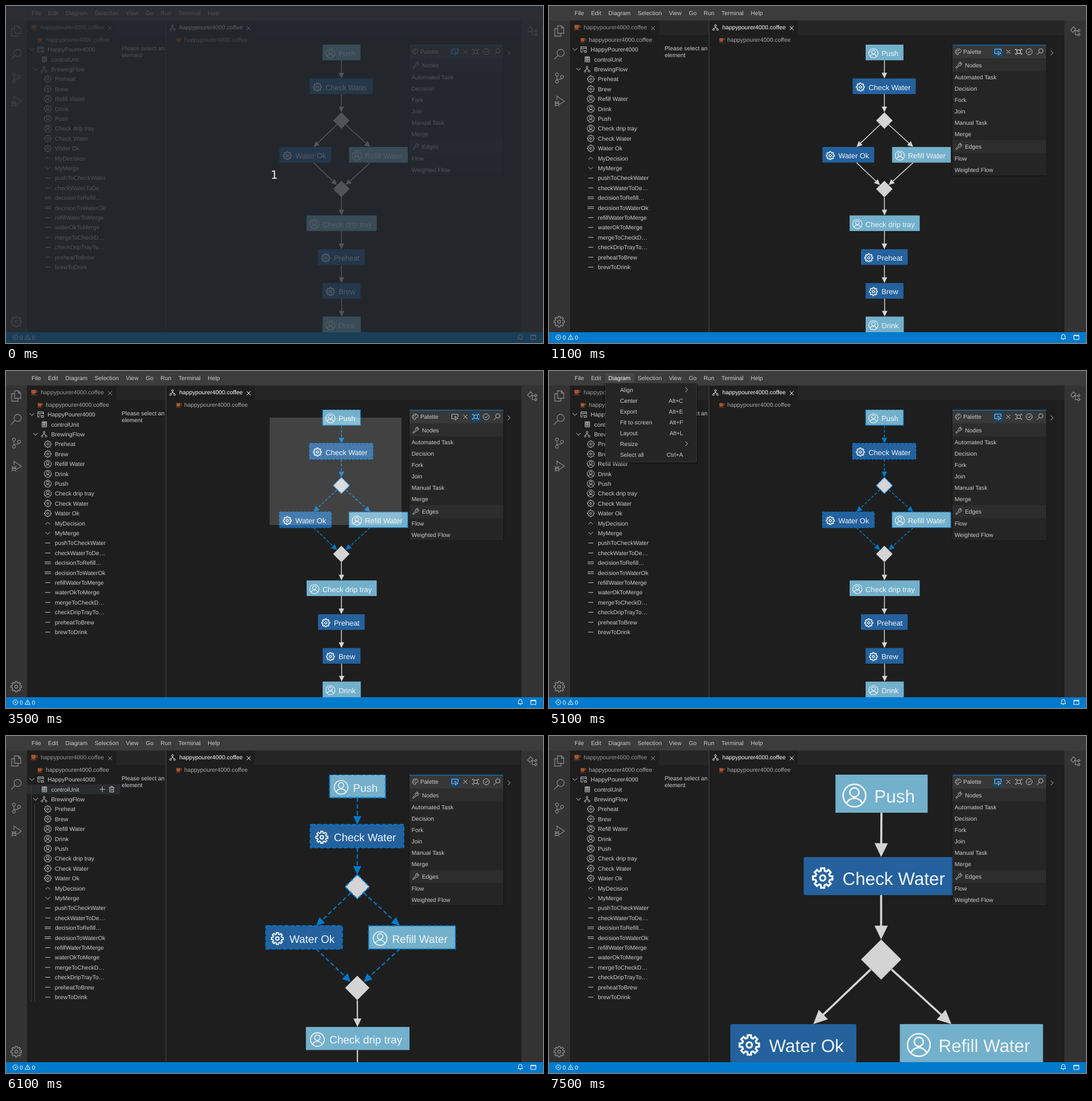
These frames come from a looping animation (945x593 px, 8000 ms). An HTML page:

```html
<!DOCTYPE html>
<html lang="en">
<head>
<meta charset="utf-8">
<title>Workflow editor</title>
<style>
html, body { margin: 0; width: 100%; height: 100%; overflow: hidden; background: #1e1e1e; }
svg { display: block; width: 945px; height: 593px; }
text { font: 10.3px "Liberation Sans", Arial, sans-serif; fill: #ccc; text-rendering: geometricPrecision; }
.node text { font-size: 12.9px; fill: #f1f6fa; }
.edge { stroke: #d4d4d4; fill: #d4d4d4; }
.edge path { stroke: none; }
.edge line { stroke-width: 1.5; }
.edge.on { stroke: #007acc; fill: #007acc; }
.edge.on line { stroke-dasharray: 5 3; }
.node.on .shape { stroke: #007acc; stroke-width: 1.4; stroke-dasharray: 5 2; }
.hot text, text.hot { fill: #fff; }
.hot path { stroke: #fff; }
.end { text-anchor: end; }
</style>
</head>
<body>
<svg id="stage" viewBox="0 0 945 593"></svg>
<script>
const LOOP = 8000, GREY = '#858585', LIGHT = '#c5c5c5', FILE = 'happypourer4000.coffee';

const rect = (x, y, w, h, fill, extra = '') =>
  `<rect x="${x}" y="${y}" width="${w}" height="${h}" fill="${fill}" ${extra}/>`;
const text = (x, y, s, extra = '') => `<text x="${x}" y="${y}" ${extra}>${s}</text>`;
const icon = (d, x, y, color = LIGHT, width = 1, scale = 1) =>
  `<path d="${d}" fill="none" stroke="${color}" stroke-width="${width / scale}" transform="translate(${x} ${y}) scale(${scale})"/>`;
const group = (id, body, extra = '') => `<g id="${id}" ${extra}>${body}</g>`;
const ring = (x, y, r) => `M${x - r},${y}a${r},${r} 0 1 0 ${2 * r},0a${r},${r} 0 1 0 ${-2 * r},0`;

function gearPath() {
  const points = [];
  for (let i = 0; i < 8; i++) {
    for (const [offset, r] of [[-.26, .7], [-.17, .94], [.17, .94], [.26, .7]]) {
      const a = i * Math.PI / 4 + offset;
      points.push((r * Math.cos(a)).toFixed(3) + ',' + (r * Math.sin(a)).toFixed(3));
    }
  }
  return 'M' + points.join('L') + 'Z' + ring(0, 0, .26);
}

const D = {
  gear: gearPath(),
  person: ring(0, 0, .95) + ring(0, -.27, .38) + 'M-.66,.68A.68,.6 0 0 1 .66,.68',
  up: 'M-4,2L0,-2L4,2',
  down: 'M-4,-2L0,2L4,-2',
  right: 'M-2,-4L2,0L-2,4',
  dash: 'M-4.5,0H4.5',
  equal: 'M-5.5,-1.5H5.5M-5.5,1.5H5.5',
  close: 'M-3.5,-3.5L3.5,3.5M3.5,-3.5L-3.5,3.5',
  flow: ring(0, -3.5, 1.6) + ring(-3.5, 3.5, 1.5) + ring(3.5, 3.5, 1.5) + 'M0,-2V0M-3.5,2L0,-.3L3.5,2',
  root: 'M-5,-4.5H5V0M-5,-4.5V4.5H-1M-5,-2H5M1,2H5V5H1ZM-3,1H0',
  unit: 'M-4,-4.5H4V-2H-4ZM-4,-2V1H4V-2M-4,1V4.5H4V1M-2,-3.2H2M-2,-.5H2M-2,2.7H2',
  search: ring(1.5, -1.5, 3.8) + 'M-1.2,1.2L-5.5,5.5',
  wrench: 'M-5,4L0,-1C-1,-4 2,-6 4,-5L2,-3L3,-1.5L5,-3.5C6,-1 4,2 1,1L-3.5,5.5Q-5,6 -5,4Z',
  palette: 'M-.5,5C-7,4 -6,-5 .5,-5C5,-5 6,-1 4.5,1C3,2.5 1,0 .5,2Q1.5,5 -.5,5' + ring(-2, -1.5, .6) + ring(1, -2.6, .6) + ring(-2.4, 1.5, .5),
  select: 'M-1,3.5H-5.5V-4.5H5.5V0M0,-1L5.5,3L2.5,3.5L1,6Z',
  marquee: 'M-3,-3H3V3H-3ZM-5.5,-2.5V-4.5H-3.5M3.5,-4.5H5.5V-2.5M5.5,2.5V4.5H3.5M-3.5,4.5H-5.5V2.5',
  check: ring(0, 0, 5.3) + 'M-2.5,0L-.6,2L2.7,-2',
  error: ring(0, 0, 4.3) + 'M-1.7,-1.7L1.7,1.7M1.7,-1.7L-1.7,1.7',
  warn: 'M0,-4.2L4.6,4H-4.6ZM0,-1.5V1.5M0,2.3V3.2',
  bell: 'M-4,3H4L3,1V-1.5A3,3 0 0 0 -3,-1.5V1ZM-1,4.5H1',
  window: 'M-4.5,-3.8H4.5V3.8H-4.5ZM-4.5,-2.5H4.5',
  files: 'M-3,-9H4L8,-5V4H-3ZM4,-9V-5H8M-3,-4H-8V9H3V4',
  branch: ring(-4, -6, 2.6) + ring(-4, 6.5, 2.6) + ring(5, -2, 2.6) + 'M-4,-3.4V4M5,.6C5,4 -4,1 -4,4',
  debug: 'M-4,-2V-9L9,0L0,6M-8,4H0M-8,0L-6,2M0,0L-2,2M-8,9L-6,7M0,9L-2,7' + ring(-4, 4.5, 3.2),
  classes: 'M-8,-2L-3,-8L1,-4L-4,2ZM-2,-1H4M0,-1V6H4M4,-1L6.5,-3.5L8.5,-1.5L6,1ZM4,6L6.5,3.5L8.5,5.5L6,8Z',
  plus: 'M-5,0H5M0,-5V5',
  trash: 'M-4.5,-3.5H4.5M-1.5,-3.5V-5H1.5V-3.5M-3.5,-3.5V4.8H3.5V-3.5M-1.2,-1.5V3M1.2,-1.5V3'
};

const cup = (x, y, s = 1) => `<g transform="translate(${x} ${y}) scale(${s})">`
  + `<path d="M-5,-4H3V0Q3,3 0,3H-2Q-5,3 -5,0ZM-6,4H4V5H-6Z" fill="#a9532e"/>`
  + `<path d="M3,-3H5.5V0H3" fill="none" stroke="#a9532e"/></g>`;

// Workflow diagram
const NODES = [
  ['person', 'Push', 557.2, 68, 66.6], ['gear', 'Check Water', 534.3, 127.5, 111.2],
  ['diamond', '', 575.7, 187, 29], ['gear', 'Water Ok', 481.3, 248.1, 91],
  ['person', 'Refill Water', 603.7, 248.1, 103.4], ['diamond', '', 575.7, 307.5, 29],
  ['person', 'Check drip tray', 529, 368.5, 123.4], ['gear', 'Preheat', 549, 428, 82.2],
  ['gear', 'Brew', 557.2, 487.4, 66.6], ['person', 'Drink', 557.2, 546.5, 67.2]
].map(([kind, label, x, y, w]) => ({ kind, label, x, y, w, h: kind === 'diamond' ? 29 : 27.5 }));

const EDGES = [
  [590.4, 95.5, 590.2, 127.5], [590.2, 155, 590.2, 187], [582.6, 208.7, 541.2, 248.1],
  [597.8, 208.7, 640.9, 248.1], [541.2, 275.6, 582.6, 315], [640.9, 275.6, 597.8, 315],
  [590.2, 336.5, 590.4, 368.5], [590.4, 396, 590.2, 428], [590.2, 455.5, 590.4, 487.4],
  [590.6, 515, 590.8, 546.5]
];

function nodeSvg({ kind, label, x, y, w, h }) {
  if (kind === 'diamond') {
    const r = w / 2;
    return `<g class="node"><path class="shape" fill="#d4d4d4" d="M${x + r},${y}l${r},${r}l${-r},${r}l${-r},${-r}Z"/></g>`;
  }
  const gear = kind === 'gear';
  return '<g class="node">' + rect(x, y, w, h, gear ? '#24619d' : '#73b0cb', `class="shape" rx="${gear ? 1 : 0}"`)
    + icon(D[kind], x + 13.7, y + 15.1, '#f1f6fa', gear ? 1.4 : 1.1, gear ? 7.6 : 8.6)
    + text(x + 28, y + 20, label) + '</g>';
}

function edgeSvg([x1, y1, x2, y2]) {
  const length = Math.hypot(x2 - x1, y2 - y1), k = 1 - 8 / length;
  const angle = Math.atan2(y2 - y1, x2 - x1) * 180 / Math.PI;
  return `<g class="edge"><line x1="${x1}" y1="${y1}" x2="${x1 + (x2 - x1) * k}" y2="${y1 + (y2 - y1) * k}"/>`
    + `<path d="M0,0L-10,-4.8V4.8Z" transform="translate(${x2} ${y2}) rotate(${angle})"/></g>`;
}

// Model tree
const ROW = 17.41;
const TREE = [
  ['gear', 'Preheat,Brew'], ['person', 'Refill Water,Drink,Push,Check drip tray'],
  ['gear', 'Check Water,Water Ok'], ['up', 'MyDecision'], ['down', 'MyMerge'],
  ['dash', 'pushToCheckWater,checkWaterToDe…'], ['equal', 'decisionToRefill…,decisionToWaterOk'],
  ['dash', 'refillWaterToMerge,waterOkToMerge,mergeToCheckD…,checkDripTrayTo…,preheatToBrew,brewToDrink']
].flatMap(([kind, labels]) => labels.split(',').map(label => [kind, label]));

function treeSvg() {
  const y = i => 76.4 + ROW * i;
  let out = group('treeHover', rect(37, 0, 164, ROW, '#2a2d2e') + icon(D.plus, 169.5, 8.7) + icon(D.trash, 186, 8.7))
    + group('guides', icon('M44.5,85V467M50.5,120V467', 0, 0, '#3d3d3d'));
  out += icon(D.down, 45.5, y(0)) + icon(D.root, 61, y(0)) + text(73.3, y(0) + 3.7, 'HappyPourer4000')
    + icon(D.unit, 67.5, y(1)) + text(79.5, y(1) + 3.7, 'controlUnit')
    + icon(D.down, 52, y(2)) + icon(D.flow, 67, y(2)) + text(79.5, y(2) + 3.7, 'BrewingFlow');
  TREE.forEach(([kind, label], i) => {
    const round = kind === 'gear' || kind === 'person';
    out += icon(D[kind], 73.5, y(i + 3), LIGHT, 1, round ? 6.5 : 1) + text(86, y(i + 3) + 3.7, label);
  });
  return out;
}

// Tool palette
const TOOLS = [['select', 790], ['close', 808.3], ['marquee', 826.5], ['check', 845], ['search', 864]];
const ENTRIES = [['Automated Task', 125.3], ['Decision', 145.3], ['Fork', 165.5], ['Join', 185.5],
  ['Manual Task', 205.5], ['Merge', 225.7], ['Flow', 268.3], ['Weighted Flow', 288.3]];

const paletteSvg = () => rect(708.5, 68, 168, 232, '#000', 'opacity=".18" rx="2"') + rect(710, 68, 165, 230, '#252526')
  + rect(710, 68.5, 165, 24, '#383838') + rect(710, 68.3, 165, 1.2, '#007acc')
  + rect(710, 93, 165, 22.5, '#2d2d2e') + rect(710, 236, 165, 22.5, '#2d2d2e')
  + icon(D.palette, 720, 80.5) + text(729, 84, 'Palette')
  + icon(D.wrench, 721, 104) + text(732, 107.7, 'Nodes') + icon(D.wrench, 721, 247) + text(732, 250.7, 'Edges')
  + rect(782, 72.8, 16.5, 16.2, '#0e4a75', 'id="active"')
  + TOOLS.map(([name, x]) => group('tool-' + name, icon(D[name], x, 80.5))).join('')
  + ENTRIES.map(([label, y], i) => text(713.7, y + 3.7, label, `id="entry${i}"`)).join('')
  + icon(D.right, 885, 82.5);

// Menus
const BAR = [['File', 45], ['Edit', 74], ['Diagram', 104.5], ['Selection', 156], ['View', 211],
  ['Go', 246], ['Run', 272], ['Terminal', 303.5], ['Help', 355]];
const MENU = [['Align'], ['Center', 'Alt+C'], ['Export', 'Alt+E'], ['Fit to screen', 'Alt+F'],
  ['Layout', 'Alt+L'], ['Resize'], ['Select all', 'Ctrl+A']];

const menuSvg = () => rect(99, 4, 51, 17, '#fff', 'opacity=".06"')
  + rect(96, 21, 166, 143, '#000', 'opacity=".22" rx="3"')
  + rect(99.5, 21, 160, 139, '#252526', 'stroke="#414141" stroke-width=".7"')
  + rect(102, 24, 154, 19, '#094771', 'id="menuHover"')
  + MENU.map(([label, keys], i) => {
    const y = 33 + 19 * i;
    return text(125, y + 3.7, label) + (keys ? text(236, y + 3.7, keys, 'class="end"') : icon(D.right, 242, y));
  }).join('');

const $ = id => document.getElementById(id);
$('stage').innerHTML =
  '<defs><clipPath id="canvas"><rect x="282" y="68" width="625" height="506"/></clipPath></defs>'
  + rect(0, 0, 945, 593, '#1e1e1e')
  + `<g clip-path="url(#canvas)">${group('diagram', EDGES.map(edgeSvg).join('') + NODES.map(nodeSvg).join(''))}`
  + rect(464, 82, 0, 0, '#fff', 'id="band" opacity=".16"') + '</g>'
  + rect(0, 25, 37, 549, '#333') + rect(907, 25, 38, 549, '#333')
  + rect(194, 25.5, 87, 25.5, '#252526') + rect(438, 25.5, 469, 25.5, '#252526')
  + rect(281, 25.5, 1, 548.5, '#444')
  + rect(0, 0, 945, 25.5, '#3c3c3c') + rect(0, 574, 945, 19, '#007acc')
  + icon(D.files, 18, 44, GREY, 1.3) + icon(D.search, 18, 85, GREY, 1.3, 1.65)
  + icon(D.branch, 18, 126.5, GREY, 1.3) + icon(D.debug, 18, 167.5, GREY, 1.3)
  + icon(D.gear, 18, 555.5, GREY, 1.5, 10) + icon(D.classes, 926, 44.5, GREY, 1.3)
  + cup(49.5, 37.3) + text(61, 41.3, FILE, 'style="fill:#969696"') + icon(D.close, 183, 39, '#969696')
  + icon(D.flow, 293, 38, '#eee') + text(305, 41.3, FILE, 'style="fill:#fff"') + icon(D.close, 427, 39, '#fff')
  + cup(60, 60, .85) + text(70, 63.3, FILE, 'id="crumb" style="fill:#a9a9a9"')
  + cup(304, 60, .85) + text(313.7, 63.3, FILE, 'style="fill:#a9a9a9"')
  + text(203.5, 77.7, 'Please select an') + text(203.5, 89.5, 'element')
  + treeSvg() + paletteSvg()
  + BAR.map(([label, x]) => text(x, 16.3, label, `id="bar-${label}"`)).join('')
  + icon(D.error, 16.5, 583, '#fff', .9) + text(24, 586.8, '0', 'class="hot"')
  + icon(D.warn, 38, 582.7, '#fff', .9) + text(45.5, 586.8, '0', 'class="hot"')
  + icon(D.bell, 905, 582.5, '#fff') + icon(D.window, 928, 583, '#fff')
  + group('menu', menuSvg())
  + group('countdown', rect(0, 0, 945, 593, '#252a31', 'opacity=".75"')
    + text(472, 304, '1', 'style="font:20px \'DejaVu Sans\',sans-serif;fill:#eee;text-anchor:middle"'));

const nodeEls = [...document.querySelectorAll('.node')];
const edgeEls = [...document.querySelectorAll('.edge')];

const show = (id, on) => $(id).style.display = on ? '' : 'none';
const hot = (id, on) => $(id).classList.toggle('hot', on);
const set = (id, attrs) => Object.entries(attrs).forEach(([k, v]) => $(id).setAttribute(k, v));
const clamp = v => Math.min(1, Math.max(0, v));
const easeInOut = t => t < .5 ? 2 * t * t : 1 - 2 * (1 - t) ** 2;

function render(t) {
  const within = (a, b) => t >= a && t < b;

  show('countdown', t < 100);
  hot('entry1', within(700, 800));
  hot('entry0', within(800, 900));
  hot('tool-marquee', within(1100, 1800));
  hot('tool-close', within(1800, 1900));
  set('active', { x: within(1500, 4100) ? 818.3 : 782 });

  // Rubber band and the selection it makes
  const drag = clamp((t - 2800) / 700);
  const right = 486 + 210 * drag, bottom = 104 + 167 * drag;
  show('band', within(2800, 4100));
  set('band', { width: right - 464, height: bottom - 82 });
  const selecting = within(2800, 7500);
  const hit = (x1, y1, x2, y2) => selecting && x1 < right && x2 > 464 && y1 < bottom + 6 && y2 > 82;
  NODES.forEach((n, i) => nodeEls[i].classList.toggle('on', hit(n.x, n.y, n.x + n.w, n.y + n.h)));
  EDGES.forEach(([x1, y1, x2, y2], i) =>
    edgeEls[i].classList.toggle('on', hit(Math.min(x1, x2), y1, Math.max(x1, x2), y2)));

  if (within(4500, 4700)) $('crumb').style.fill = '#e0e0e0';
  else $('crumb').style.fill = '#a9a9a9';
  hot('bar-Diagram', within(4900, 6000));
  show('menu', within(5100, 6000));
  show('menuHover', t >= 5500);
  set('menuHover', { y: 24 + 19 * Math.round(3 * clamp((t - 5500) / 300)) });

  // Fit to selection: zoom moves exponentially, scroll linearly
  const fit = easeInOut(clamp((t - 5983) / 250));
  set('diagram', { transform: `translate(282 68) scale(${2.437 ** fit}) translate(${-282 - 184.07 * fit} -68)` });

  show('treeHover', within(6000, 7100));
  show('guides', within(6000, 7100));
  set('treeHover', { transform: `translate(0 ${t < 7000 ? 85.1 : 85.1 + ROW})` });
}

const start = performance.now();
function tick() {
  const t = (performance.now() - start) % LOOP;
  render(Math.floor(t / 100) * 100);
  requestAnimationFrame(tick);
}
tick();
</script>
</body>
</html>
```
